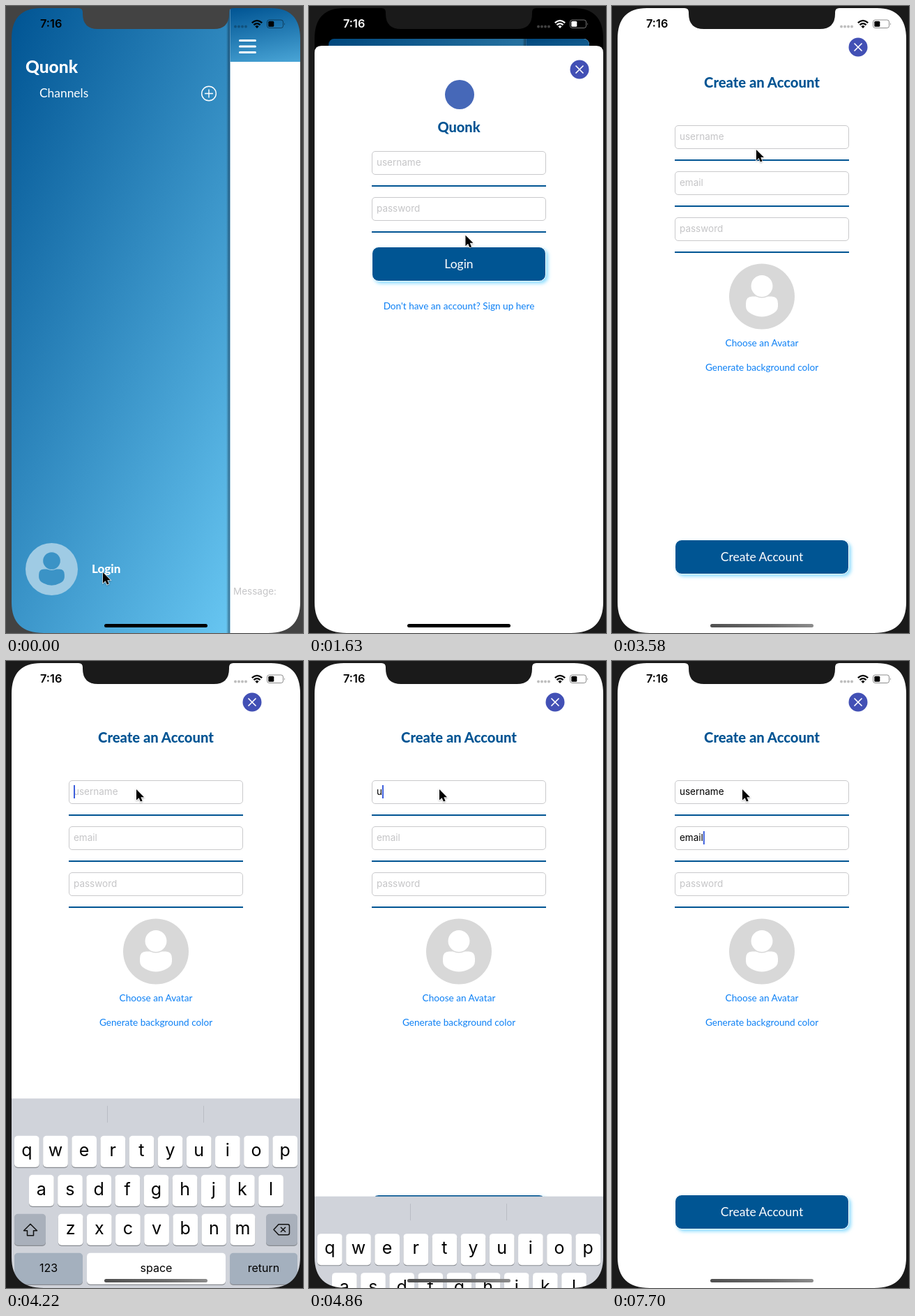
These frames come from a looping animation (426x899 px, 8000 ms). An HTML page:

```html
<!DOCTYPE html>
<html lang="en">
<head>
<meta charset="utf-8">
<title>Sign up flow</title>
<style>
html, body { margin: 0; width: 100%; height: 100%; overflow: hidden; background: #1a1a1a; }
svg { display: block; width: 100%; height: 100%; }
text { font-family: Lato, sans-serif; white-space: pre; }
.ui { font-family: Inter, sans-serif; }
.mid { text-anchor: middle; }
.heavy { font-weight: 800; }
.ocean { fill: #005493; }
.link { font-size: 13.6px; fill: #0d80f5; }
.field { font-size: 13.5px; }
.hint { fill: #c5c5c7; }
.button { font-size: 17.5px; fill: #fff; }
.letter { font-size: 25px; }
.word { font-size: 16px; }
</style>
</head>
<body>
<svg viewBox="0 0 426 899" preserveAspectRatio="none">
  <defs>
    <linearGradient id="sky" x2="1" y2="1">
      <stop stop-color="#005493"/><stop offset="1" stop-color="#76d6ff"/>
    </linearGradient>
    <linearGradient id="edge">
      <stop stop-color="#000" stop-opacity="0"/><stop offset="1" stop-color="#002040" stop-opacity=".55"/>
    </linearGradient>
    <linearGradient id="bar">
      <stop stop-color="#505050"/><stop offset=".6" stop-color="#6c6c6c"/><stop offset="1" stop-color="#8c8c8c"/>
    </linearGradient>
    <filter id="glow" x="-10%" y="-30%" width="120%" height="170%">
      <feDropShadow dx="3" dy="3" stdDeviation="2.5" flood-color="#76d6ff" flood-opacity=".8"/>
    </filter>
    <filter id="soft" x="-50%" y="-50%" width="200%" height="200%">
      <feDropShadow dx="0" dy="1" stdDeviation="1" flood-opacity=".35"/>
    </filter>
    <clipPath id="card"><rect x="8" y="3" width="414" height="896" rx="9"/></clipPath>
  </defs>

  <rect width="426" height="899"/>

  <g id="menu"><g clip-path="url(#card)">
    <rect x="8" y="3" width="414" height="896" fill="url(#sky)"/>
    <g fill="#fff">
      <text class="heavy" x="28" y="96" font-size="24.5">Quonk</text>
      <text x="48" y="131" font-size="17.4">Channels</text>
      <text id="loginLabel" class="heavy" x="123" y="812.5" font-size="17">Login</text>
    </g>
    <path d="M285 125.500h12M291 119.500v12M301.300 125.500a10.300 10.300 0 1 0-20.600 0a10.300 10.300 0 1 0 20.600 0"
      fill="none" stroke="#fff" stroke-width="1.400"/>
    <g id="menuAvatar" transform="translate(65.500 807.500) scale(.798)"></g>
    <rect x="316" y="3" width="5.500" height="896" fill="url(#edge)"/>
    <rect x="321.500" y="3" width="414" height="896" fill="#fff"/>
    <rect x="321.500" y="3" width="414" height="77" fill="url(#sky)"/>
    <path d="M335.500 49.500h22M335.500 58h22M335.500 66.500h22" stroke="#fff" stroke-width="3" stroke-linecap="round"/>
    <text class="ui field hint" x="326" y="844">Message:</text>
    <rect id="dim" x="8" y="3" width="414" height="896"/>
  </g></g>

  <g id="login"></g>
  <g id="create"></g>
  <g id="keyboard"></g>

  <g id="status">
    <text class="ui" x="49" y="31.300" font-size="16.300" font-weight="600">7:16</text>
    <path d="M329 29.500h.01M334 29.500h.01M339 29.500h.01M344 29.500h.01" stroke="currentColor"
      stroke-width="4" stroke-linecap="round" opacity=".25"/>
    <g fill="none" stroke="currentColor" stroke-width="2.300">
      <path d="M352.800 24.200q7.200-6.600 14.400 0M355.400 27.200q4.600-4.200 9.200 0"/>
    </g>
    <path d="M357.400 29.200q2.600-2.200 5.200 0L360 32Z"/>
    <rect x="374.500" y="20" width="23" height="11.500" rx="3" fill="none" stroke="currentColor" opacity=".45"/>
    <rect x="376.300" y="21.800" width="8" height="8" rx="1.500"/>
    <path d="M399 23.800q1.800 2 0 4z" opacity=".45"/>
  </g>
  <rect id="home" x="141" y="886" width="148" height="5" rx="2.500"/>

  <path id="frame" fill-rule="evenodd" d="M0 0H426V899H0Z
    M50 3Q8 3 8 47V855Q8 899 54 899H376Q422 899 422 855V47Q422 3 380 3H326Q320 3 320 9V11Q320 33 298 33H132Q110 33 110 11V9Q110 3 104 3Z"/>
  <path id="cursor" d="M0 0V15.500L3.600 12.200L6 17.600L8.600 16.500L6.300 11.200H11Z"
    stroke="#fff" stroke-width="1.200" paint-order="stroke" filter="url(#soft)"/>
</svg>

<script>
const LOOP = 8000;
const $ = id => document.getElementById(id);
const move = (id, x, y) => $(id).setAttribute('transform', `translate(${x} ${y})`);

// ---- Building blocks ----
const label = (cls, x, y, text, extra = '') => `<text class="${cls}" x="${x}" y="${y}" ${extra}>${text}</text>`;

const field = (name, y) => `
  <rect x="90.500" y="${y + .5}" width="249" height="33" rx="4.500" fill="#fff" stroke="#c9c9cb"/>
  ${label('ui field hint', 97, y + 21, name, `id="${name}Field"`)}
  <rect x="90" y="${y + 49}" width="250" height="2" class="ocean"/>`;

const button = (text, y) => `
  <rect x="90.500" y="${y - .5}" width="249" height="49" rx="9.500" fill="#005493" stroke="#fff" filter="url(#glow)"/>
  ${label('button mid', 215, y + 29.5, text)}`;

const closeButton = (x, y) => `
  <circle cx="${x}" cy="${y}" r="13.500" fill="#4250b5"/>
  <path d="M${x - 5.5} ${y - 5.5}l11 11m0-11l-11 11" stroke="#fff" stroke-width="1.600"/>`;

const avatar = (disc, person) => `
  <circle r="47" fill="${disc}"/>
  <path d="M-23 10Q-23 0-14 0H14Q23 0 23 10V14Q23 21 15 25Q0 33-15 25Q-23 21-23 14Z" fill="${person}"/>
  <circle cy="-15" r="16.200" fill="${person}" stroke="${disc}" stroke-width="1.500"/>`;

const key = (x, y, w, fill = '#fff') => `
  <rect x="${x}" y="${y + 1.2}" width="${w}" height="45" rx="5" fill="#888b91"/>
  <rect x="${x}" y="${y}" width="${w}" height="45" rx="5" fill="${fill}"/>`;

const keyRow = (letters, x, y) => [...letters].map((ch, i) => {
  const left = x + i * 41.15;
  return key(left, y, 35.7) + label('ui letter mid', left + 17.8, y + 29, ch);
}).join('');

const wordKey = (text, x, w, fill) =>
  key(x, 775, w, fill) + label('ui word mid', x + w / 2, 802, text);

$('menuAvatar').innerHTML = avatar('#9fcbe4', '#3b93c6');

$('login').innerHTML = `
  <path d="M8 1000V67Q8 57 18 57H412Q422 57 422 67V1000Z" fill="#fff"/>
  ${closeButton(388, 91)}
  <circle cx="216" cy="127" r="21" fill="#4668b8"/>
  ${label('heavy ocean mid', 215, 181, 'Quonk', 'font-size="20"')}
  ${field('username', 208).replace('usernameField', 'loginName')}
  ${field('password', 274).replace('passwordField', 'loginPass')}
  ${button('Login', 346)}
  ${label('link mid', 215, 434.5, "Don't have an account? Sign up here", 'id="signUp"')}`;

$('create').innerHTML = `
  <rect x="8" y="3" width="414" height="896" fill="#fff"/>
  ${closeButton(353, 59)}
  ${label('heavy ocean mid', 215, 117, 'Create an Account', 'font-size="20.200"')}
  ${field('username', 171)}${field('email', 237)}${field('password', 303)}
  <rect id="caret" width="2" height="19" fill="#3d5fdc"/>
  <g transform="translate(215 416.500)">${avatar('#d8d8d8', '#fff')}</g>
  ${label('link mid', 215, 488, 'Choose an Avatar')}
  ${label('link mid', 215, 523, 'Generate background color')}
  ${button('Create Account', 766)}`;

const GREY_KEY = '#a9b0bb';
$('keyboard').innerHTML = `
  <rect x="8" y="553.500" width="414" height="346" fill="#d0d3da"/>
  <path d="M145.500 564v24M283.500 564v24" stroke="#b9bcc4"/>
  ${keyRow('qwertyuiop', 12, 607)}${keyRow('asdfghjkl', 33, 663)}${keyRow('zxcvbnm', 74.8, 719)}
  ${key(12, 719, 45, GREY_KEY)}${key(373, 719, 45, GREY_KEY)}
  ${wordKey('123', 12, 98, '#a4b0be')}${wordKey('space', 116, 199)}${wordKey('return', 321, 97, '#a4b0be')}
  <g fill="none" stroke="#111" stroke-width="1.500" stroke-linejoin="round">
    <path d="M35 733.500l9.500 9.500h-5v7h-9v-7h-5Z"/>
    <path d="M391 734h13q2.500 0 2.500 2.500v10q0 2.500-2.500 2.500h-13l-7-7.500ZM394 738l7 7m0-7l-7 7"/>
  </g>
  <g fill="none" stroke="#50555c" stroke-width="2">
    <circle cx="49.500" cy="859" r="12.300"/>
    <path d="M42 861.500h15q-1.500 6.500-7.500 6.500t-7.500-6.500Z" fill="#50555c" stroke-width="1"/>
    <path d="M45.500 853v4M53.500 853v4" stroke-linecap="round"/>
    <rect x="377" y="845" width="8.500" height="17" rx="4.200"/>
    <path d="M372.500 856v2.500q0 8 8.700 8t8.700-8v-2.500M381.200 866.500v6M376 872.500h10.500"/>
  </g>`;

// ---- Motion ----
const cursorPath = [
  [0, 139, 812], [920, 139, 812], [1450, 213, 281], [1750, 232, 360], [2030, 222, 418],
  [2570, 222, 418], [2630, 221, 421], [3280, 221, 421], [3580, 207, 206], [3810, 187, 184], [LOOP, 187, 184]
];
const typing = {
  username: [4700, 4900, 5050, 5200, 5320, 5450, 5600, 6080],
  email: [6920, 7160, 7340, 7460, 7700]
};

const ramp = (t, a, b) => Math.min(1, Math.max(0, (t - a) / (b - a)));
const easeOut = p => 1 - (1 - p) ** 3;

// Critically damped slide, first seen 50 ms after it begins.
function rise(t, start) {
  if (t < start + 50) return 0;
  const x = (t - start) * .0305;
  const left = (1 + x) * Math.exp(-x);
  return left < .0006 ? 1 : 1 - left;
}

function along(path, t) {
  const i = path.findIndex(step => step[0] > t);
  const [t0, x0, y0] = path[i - 1], [t1, x1, y1] = path[i];
  const p = (t - t0) / (t1 - t0);
  return [x0 + (x1 - x0) * p, y0 + (y1 - y0) * p];
}

function typeInto(name, t) {
  const count = typing[name].filter(at => at <= t).length;
  const node = $(name + 'Field');
  const text = count ? name.slice(0, count) : name;
  if (node.textContent !== text) node.textContent = text;
  node.style.fill = count ? '#000' : '';
  return count ? node.getComputedTextLength() : 0;
}

function draw(t) {
  const sheet = rise(t, 640), full = rise(t, 3230);
  const scale = 1 - .0966 * sheet;
  $('menu').setAttribute('transform', `translate(215 ${3 + 44 * sheet}) scale(${scale}) translate(-215 -3)`);
  $('dim').setAttribute('opacity', .15 * sheet);
  move('login', 0, 842 * (1 - sheet));
  move('create', 0, 896 * (1 - full));
  move('keyboard', 0, 346 * (1 - easeOut(ramp(t, 4060, 4460)) + easeOut(ramp(t, 4740, 5180))));

  $('loginLabel').setAttribute('opacity', t >= 540 && t < 690 ? .3 : 1);
  $('signUp').setAttribute('opacity', 1 - .8 * ramp(t, 2570, 2810) + .8 * ramp(t, 2960, 3130));

  const white = t < 690 ? 0 : Math.round(255 * (1 - ramp(t, 2960, 3130)));
  const ink = `rgb(${white},${white},${white})`;
  $('status').style.color = $('status').style.fill = ink;
  $('home').setAttribute('fill', t < 3130 ? '#000' : 'url(#bar)');
  $('frame').setAttribute('fill', t < 450 ? '#434343' : '#1a1a1a');

  const nameWidth = typeInto('username', t), mailWidth = typeInto('email', t);
  const onMail = t >= 6500;
  move('caret', 97 + (onMail ? mailWidth : nameWidth), onMail ? 244 : 178);
  $('caret').setAttribute('opacity', t >= 4040 ? 1 : 0);
  move('cursor', ...along(cursorPath, t));
}

function tick() {
  draw(performance.now() % LOOP);
  requestAnimationFrame(tick);
}
tick();
</script>
</body>
</html>
```
